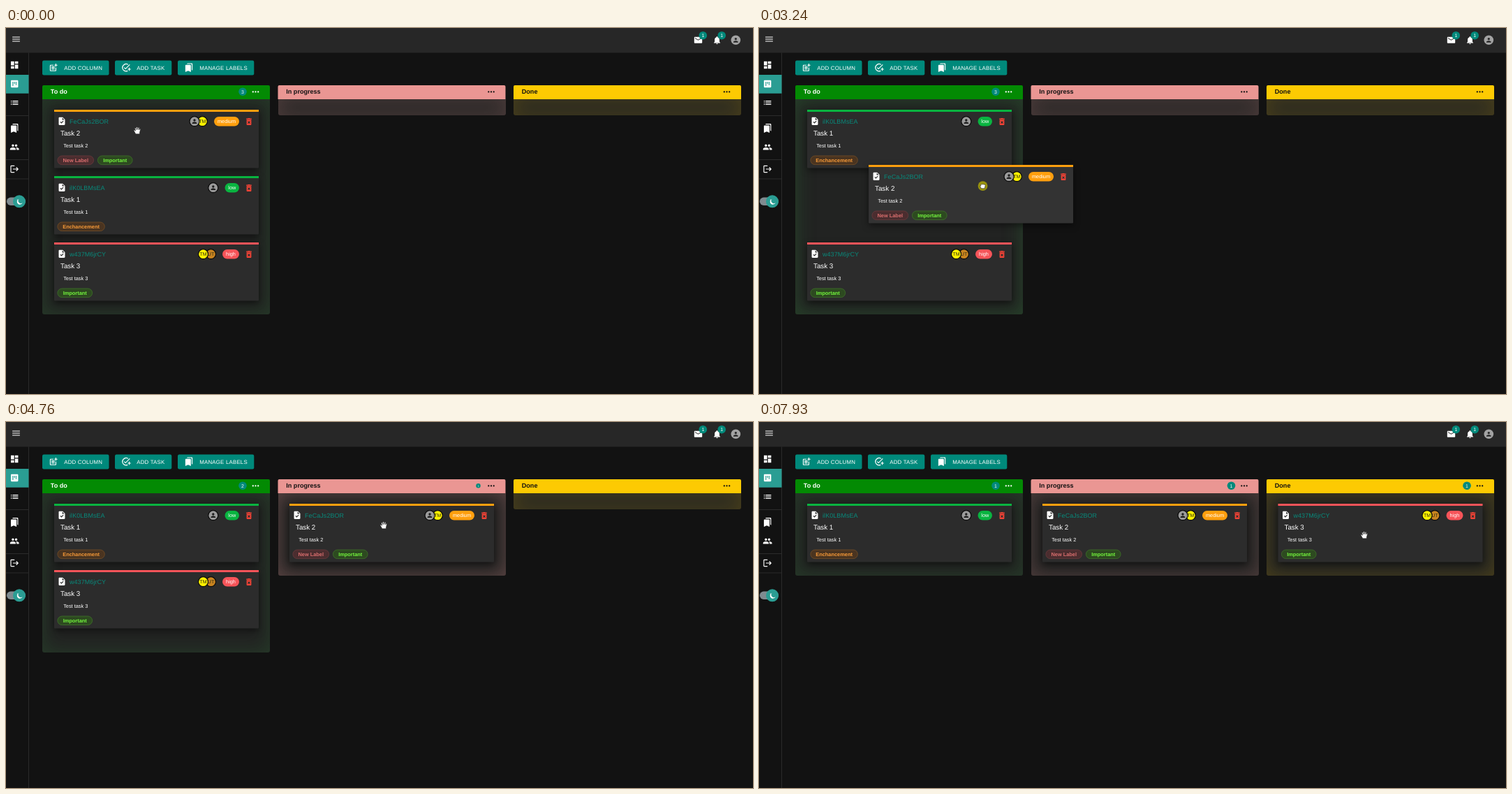
Recreate the animation shown at these times as an HTML page. Size 1070 by 524 pixels, loop 8 s.

```html
<!DOCTYPE html>
<html lang="en">
<head>
<meta charset="utf-8">
<title>Task board</title>
<style>
html, body { margin: 0; width: 100%; height: 100%; overflow: hidden; background: #121212; }
svg { position: absolute; left: 0; top: 0; width: 1070px; height: 524px; }
text { font-family: "Liberation Sans", Arial, sans-serif; text-rendering: geometricPrecision; }
.body { position: absolute; top: 102px; width: 326px; background: #222322; border-radius: 0 0 3px 3px; }
.face { filter: drop-shadow(0 3px 5px rgba(0,0,0,.5)); }
</style>
</head>
<body>
<svg id="stage" viewBox="0 0 1070 524"></svg>
<script>
const LOOP = 8000;
const TEAL = '#00897b';
const stage = document.getElementById('stage');

const ICONS = {
  menu: 'M3 18h18v-2H3zm0-5h18v-2H3zm0-7v2h18V6z',
  dashboard: 'M3 13h8V3H3zm0 8h8v-6H3zm10 0h8V11h-8zm0-18v6h8V3z',
  board: 'M19 3H5c-1.1 0-2 .9-2 2v14c0 1.1.9 2 2 2h14c1.1 0 2-.9 2-2V5c0-1.1-.9-2-2-2zM7 7h2v10H7zm4 0h2v5h-2zm4 0h2v8h-2z',
  list: 'M3 13h2v-2H3zm0 4h2v-2H3zm0-8h2V7H3zm4 4h14v-2H7zm0 4h14v-2H7zM7 7v2h14V7z',
  bookmarks: 'M19 18l2 1V3c0-1.1-.9-2-2-2H9C7.9 1 7 1.9 7 3h10c1.1 0 2 .9 2 2zM15 5H5c-1.1 0-2 .9-2 2v16l7-3 7 3V7c0-1.1-.9-2-2-2z',
  people: 'M16 11a3 3 0 1 0 0-6 3 3 0 0 0 0 6zm-8 0a3 3 0 1 0 0-6 3 3 0 0 0 0 6zm0 2c-2.3 0-7 1.2-7 3.5V19h14v-2.5c0-2.3-4.7-3.5-7-3.5zm8 0l-1 .05c1.2.8 2 2 2 3.45V19h6v-2.5c0-2.3-4.7-3.5-7-3.5z',
  logout: 'M17 7l-1.4 1.4 2.6 2.6H8v2h10.2l-2.6 2.6L17 17l5-5zM4 5h8V3H4c-1.1 0-2 .9-2 2v14c0 1.1.9 2 2 2h8v-2H4z',
  mail: 'M20 4H4c-1.1 0-2 .9-2 2v12c0 1.1.9 2 2 2h16c1.1 0 2-.9 2-2V6c0-1.1-.9-2-2-2zm0 4l-8 5-8-5V6l8 5 8-5z',
  bell: 'M12 22c1.1 0 2-.9 2-2h-4c0 1.1.9 2 2 2zm6-6v-5c0-3.1-1.6-5.6-4.5-6.3V4a1.5 1.5 0 0 0-3 0v.7C7.6 5.4 6 7.9 6 11v5l-2 2v1h16v-1z',
  person: 'M12 12a4 4 0 1 0 0-8 4 4 0 0 0 0 8zm0 2c-2.7 0-8 1.3-8 4v2h16v-2c0-2.7-5.3-4-8-4z',
  trash: 'M6 19c0 1.1.9 2 2 2h8c1.1 0 2-.9 2-2V7H6zm2.5-7.1l1.4-1.4 2.1 2.1 2.1-2.1 1.4 1.4-2.1 2.1 2.1 2.1-1.4 1.4-2.1-2.1-2.1 2.1-1.4-1.4 2.1-2.1zM15.5 4l-1-1h-5l-1 1H5v2h14V4z',
  task: 'M14 2H6c-1.1 0-2 .9-2 2v16c0 1.1.9 2 2 2h12c1.1 0 2-.9 2-2V8zm-3.1 16l-3.5-3.5 1.4-1.4 2.1 2.1 4.3-4.3 1.4 1.4zM13 9V3.5L18.5 9z',
  addPost: 'M17 19H5V7h7V5H5c-1.1 0-2 .9-2 2v12c0 1.1.9 2 2 2h12c1.1 0 2-.9 2-2v-7h-2zM19 2h-2v3h-3v2h3v3h2V7h3V5h-3zM7 9h8v2H7zm0 3h8v2H7zm0 3h8v2H7z',
  addTask: 'M22 5.2L10.6 16.6l-4.2-4.2 1.4-1.4 2.8 2.8 10-10zM12 20a8 8 0 1 1 4.3-14.75l1.4-1.45A10 10 0 1 0 16.8 20.8l-1.5-1.5c-1 .5-2.1.7-3.3.7zM19 15h-3v2h3v3h2v-3h3v-2h-3v-3h-2z'
};

function el(parent, tag, attrs, content) {
  const node = document.createElementNS('http://www.w3.org/2000/svg', tag);
  for (const key in attrs) node.setAttribute(key, attrs[key]);
  if (content !== undefined) node.textContent = content;
  return parent.appendChild(node);
}
const group = (parent, attrs = {}) => el(parent, 'g', attrs);
const rect = (parent, x, y, width, height, fill, rx = 0, more = {}) =>
  el(parent, 'rect', { x, y, width, height, fill, rx, ...more });
const circle = (parent, cx, cy, r, fill, more = {}) => el(parent, 'circle', { cx, cy, r, fill, ...more });
const text = (parent, x, y, size, fill, content, more = {}) =>
  el(parent, 'text', { x, y, 'font-size': size, fill, ...more }, content);
const middle = { 'text-anchor': 'middle' };
const bold = { 'font-weight': 700 };

function icon(parent, name, x, y, fill = '#fff', scale = .57) {
  el(parent, 'path', {
    d: ICONS[name], fill, 'fill-rule': 'evenodd',
    transform: `translate(${x} ${y}) scale(${scale}) translate(-12 -12)`
  });
}
function badge(parent, x, y, label) {
  const g = group(parent);
  circle(g, 0, 0, 5.8, TEAL);
  const value = text(g, 0, 2.5, 6.9, '#fff', label, middle);
  const show = (scale, content) => {
    g.setAttribute('transform', `translate(${x} ${y}) scale(${scale})`);
    if (content !== undefined) value.textContent = content;
  };
  show(1);
  return show;
}
function avatar(parent, x, y, initials, fill) {
  circle(parent, x, y, 7, fill, { stroke: '#0c0c0c', 'stroke-width': 1.2 });
  if (initials) text(parent, x, y + 2.5, 7, '#2b2b10', initials, middle);
  else icon(parent, 'person', x, y, '#1d1d1d', .42);
}

// Application frame
rect(stage, 0, 0, 1070, 35.5, '#272727');
rect(stage, 32, 35.5, 1, 489, '#2b2b2b');
rect(stage, 0, 67, 32.5, 26.7, '#2a9d93');
for (const y of [125, 188, 215.5]) rect(stage, 0, y, 32, 1, '#2b2b2b');
icon(stage, 'menu', 14.5, 16, '#fff', .6);
[['dashboard', 53], ['board', 80], ['list', 107], ['bookmarks', 143.5], ['people', 170.5], ['logout', 202]]
  .forEach(([name, y]) => icon(stage, name, 12.2, y, '#fff', .58));
rect(stage, 1, 242.5, 27, 11.5, '#7f8b90', 5.7);
circle(stage, 19, 248.3, 9, '#2a9d93');
el(stage, 'path', { d: 'M18.6 244.9a4 4 0 1 0 5 5a3.4 3.4 0 0 1-5-5z', fill: '#fff' });
circle(stage, 16.4, 246.2, .6, '#fff');

icon(stage, 'mail', 991.5, 17.3);
icon(stage, 'bell', 1018.5, 17.5);
badge(stage, 998.3, 10.7, 1);
badge(stage, 1025.2, 10.7, 1);
circle(stage, 1045.3, 17.3, 6.8, '#a3a3a3');
icon(stage, 'person', 1045.3, 17.3, '#272727', .42);

[[52, 95.5, 'addPost', 'ADD COLUMN'], [156, 81.3, 'addTask', 'ADD TASK'], [246, 109.3, 'bookmarks', 'MANAGE LABELS']]
  .forEach(([x, width, name, label]) => {
    rect(stage, x, 46.5, width, 21, TEAL, 2.2);
    icon(stage, name, x + 16, 56.7);
    text(stage, x + 31.2, 59.6, 7.85, '#fff', label, { 'letter-spacing': .22 });
  });

// Columns
const columns = [
  { x: 52, title: 'To do', fill: '#038a03', ink: '#fff', glow: '45,120,55' },
  { x: 389.5, title: 'In progress', fill: '#ea9693', ink: '#111', glow: '190,125,125' },
  { x: 727, title: 'Done', fill: '#fdca02', ink: '#111', glow: '175,140,10' }
];
for (const col of columns) {
  col.body = document.createElement('div');
  col.body.className = 'body';
  col.body.style.left = col.x + 'px';
  document.body.insertBefore(col.body, stage);
  el(stage, 'path', { d: `M${col.x} 102v-18q0-2 2-2h322q2 0 2 2v18z`, fill: col.fill });
  text(stage, col.x + 11.8, 94.3, 9.05, col.ink, col.title, bold);
  for (let i = -1; i < 2; i++) circle(stage, col.x + 305.5 + i * 3.7, 91.4, 1.15, col.ink);
  col.badge = badge(stage, col.x + 287, 91.2, 1);
}

// Cards
const LABELS = {
  'New Label': [52.3, '#4b2d2f', '#703c3e', '#d96e6e'],
  'Important': [50.3, '#2d4a20', '#41792a', '#73f53d'],
  'Enchancement': [68, '#4a3420', '#7d5226', '#f79a38']
};
const YELLOW = '#fff200', GREY = '#9b9b9b', BROWN = '#c98420';
const cardLayer = group(stage);

function makeCard(number, id, priority, color, chipWidth, avatars, labels) {
  const g = group(cardLayer);
  const face = rect(g, 0, .5, 293, 83, '#2c2c2c', 1, { class: 'face' });
  rect(g, 0, 0, 293, 3, color);
  icon(g, 'task', 11, 16.3, '#fff', .56);
  text(g, 22, 19.7, 8.98, '#08897b', id, { 'letter-spacing': .08 });
  text(g, 9, 36.8, 9.8, '#fff', 'Task ' + number);
  text(g, 13.2, 53.8, 7.35, '#fff', 'Test task ' + number);
  avatars.forEach(args => avatar(g, args[0], 16.7, args[1], args[2]));
  rect(g, 265 - chipWidth, 10, chipWidth, 13.5, color, 6.75);
  text(g, 265 - chipWidth / 2, 19.3, 7.3, '#fff', priority, middle);
  icon(g, 'trash', 279, 17, '#f44336', .56);
  let x = 4.6;
  for (const name of labels) {
    const [width, fill, stroke, ink] = LABELS[name];
    rect(g, x + .3, 66, width - .6, 12.6, fill, 6.3, { stroke, 'stroke-width': .7 });
    text(g, x + width / 2, 74.8, 7.4, ink, name, { ...middle, ...bold });
    x += width + 5.2;
  }
  return {
    g,
    place([left, top], lifted) {
      g.setAttribute('transform', `translate(${left} ${top})`);
      face.setAttribute('fill', lifted ? '#333' : '#2c2c2c');
    }
  };
}
const cards = [
  makeCard(1, 'ilK0LBMsEA', 'low', '#09b440', 20.5, [[227.8, '', GREY]], ['Enchancement']),
  makeCard(2, 'FeCaJs2BOR', 'medium', '#ff9f0e', 36, [[212.3, 'TM', YELLOW], [201, '', GREY]], ['New Label', 'Important']),
  makeCard(3, 'w437M6jrCY', 'high', '#f75459', 24, [[224.5, 'UT', BROWN], [213.5, 'TM', YELLOW]], ['Important'])
];

// Pointer
const pointer = group(stage);
const halo = circle(pointer, 0, 0, 6.9, '#b5ad05', { 'fill-opacity': .78 });
const outline = { fill: '#fff', stroke: '#222', 'stroke-width': .6, 'stroke-linejoin': 'round' };
const shapes = {
  open: el(pointer, 'path', { ...outline, d: 'M-2.2 4.8L-5-.2q.3-1.4 1.7-.3l.8.8-.9-3.6q.9-1.5 1.7 0l.6 2-.2-3.2q.9-1.4 1.7 0l.3 3 .5-2.7q1.1-1.1 1.6.2l-.2 3 .7-1.5q1.2-.7 1.3.5L3.4 3.2V4.8z' }),
  fist: el(pointer, 'path', { ...outline, d: 'M-2 3.7L-3.7 1q-.3-1.6 1-1.3V-1.5q.7-1.4 1.7-.5 1-1 1.8 0 1-.7 1.7.3 1.2-.2 1.2 1.2L2.9 2.2V3.7z' }),
  arrow: el(pointer, 'path', { ...outline, d: 'M0 0V9L2.1 7.1 3.5 10.2 5 9.5 3.6 6.5H6.4z' })
};

// Timing helpers
const clamp = v => Math.max(0, Math.min(1, v));
const mix = (a, b, u) => a + (b - a) * u;
const span = (t, start, length) => clamp((t - start) / length);
const slide = (t, start, length = 200) => 1 - (1 - span(t, start, length)) ** 3.6;
const smooth = u => u * u * (3 - 2 * u);

function track(keys, t) {
  const next = keys.findIndex(key => key[0] > t);
  if (next < 0) return keys[keys.length - 1].slice(1);
  if (next === 0) return keys[0].slice(1);
  const [a, b] = [keys[next - 1], keys[next]];
  const u = (t - a[0]) / (b[0] - a[0]);
  return [mix(a[1], b[1], u), mix(a[2], b[2], u)];
}

const drags = [
  { card: 1, press: 530, drop: 1600, grab: [119, 30], home: [69, 212],
    keys: [[590, 69, 117], [720, 72, 126], [900, 78, 158], [1060, 80.5, 194.5], [1120, 82, 208], [1330, 80, 220], [1400, 78, 219], [1540, 79, 220]] },
  { card: 1, press: 2350, drop: 4250, grab: [132, 37], home: [406, 117],
    keys: [[2650, 69, 212], [2960, 85, 209], [3050, 85, 209], [3180, 125, 203], [3380, 230, 180], [3520, 330, 155], [3660, 379, 142], [3860, 405, 115], [4000, 408, 112]] },
  { card: 2, press: 5370, drop: 6420, grab: [186, 56], home: [743.5, 117],
    keys: [[5440, 69, 212], [5560, 170, 200], [5840, 634, 135], [5920, 680, 112], [6180, 735, 92]] }
];
const roaming = [
  [0, 188, 147], [1600, 188, 147], [1600, 198, 251], [2110, 198, 251], [2170, 199, 250], [2300, 199, 250], [2360, 201, 249],
  [4250, 201, 249], [4250, 540, 149], [4760, 541, 148], [5060, 541, 148], [5330, 255, 268],
  [6420, 255, 268], [6420, 921, 148], [7600, 921, 148], [7660, 902, 147], [7750, 847, 172], [7840, 853, 168], [7930, 867, 162]
];
const POINTER_LEAD = 60;
const DROP_TIME = 340;

function update(t) {
  const places = [
    [69, mix(212, 117, slide(t, 960))],
    [69, 117],
    [69, mix(307, 212, slide(t, 3280))]
  ];
  let held = null, falling = false;
  for (const drag of drags) {
    if (t < drag.press) continue;
    const from = track(drag.keys, Math.min(t, drag.drop));
    const u = 1 - (1 - span(t, drag.drop, DROP_TIME)) ** 5;
    places[drag.card] = from.map((v, i) => mix(v, drag.home[i], u));
    if (t < drag.drop) held = drag;
    else if (t < drag.drop + DROP_TIME) falling = true;
    cardLayer.lastChild !== cards[drag.card].g && cardLayer.append(cards[drag.card].g);
  }
  if (t < drags[0].press) cardLayer.append(cards[1].g);
  const moving = held && t > held.keys[0][0];
  cards.forEach((card, i) => card.place(places[i], moving && held.card === i));

  const bottoms = [
    409.5 - 94.7 * (slide(t, 4650, 280) + slide(t, 6780, 240)),
    125 + 95 * slide(t, 3690),
    125 + 95 * slide(t, 5900)
  ];
  const over = [
    t > 590 && t < 1800 || t > 2690 && t < 3280 || t > 5440 && t < 5600,
    t > 3690 && t < 4900,
    t > 5900 && t < 7040
  ];
  columns.forEach((col, i) => {
    col.body.style.height = bottoms[i] - 102 + 'px';
    col.body.style.boxShadow = `inset 0 0 28px rgba(${col.glow},${over[i] ? .4 : .3})`;
  });
  columns[0].badge(1, t < 4650 ? 3 : t < 6780 ? 2 : 1);
  columns[1].badge(smooth(span(t, 4640, 225)));
  columns[2].badge(smooth(span(t, 6790, 225)));

  const [x, y] = held
    ? track(held.keys, t + POINTER_LEAD).map((v, i) => v + held.grab[i])
    : track(roaming, t);
  pointer.setAttribute('transform', `translate(${x} ${y})`);
  halo.style.display = held ? '' : 'none';
  const betweenCards = t > 5150 && t < 5250;
  const shape = moving ? 'fist' : falling || betweenCards ? 'arrow' : 'open';
  for (const name in shapes) shapes[name].style.display = name === shape ? '' : 'none';
}

function frame() {
  update(performance.now() % LOOP);
  requestAnimationFrame(frame);
}
frame();
</script>
</body>
</html>
```
